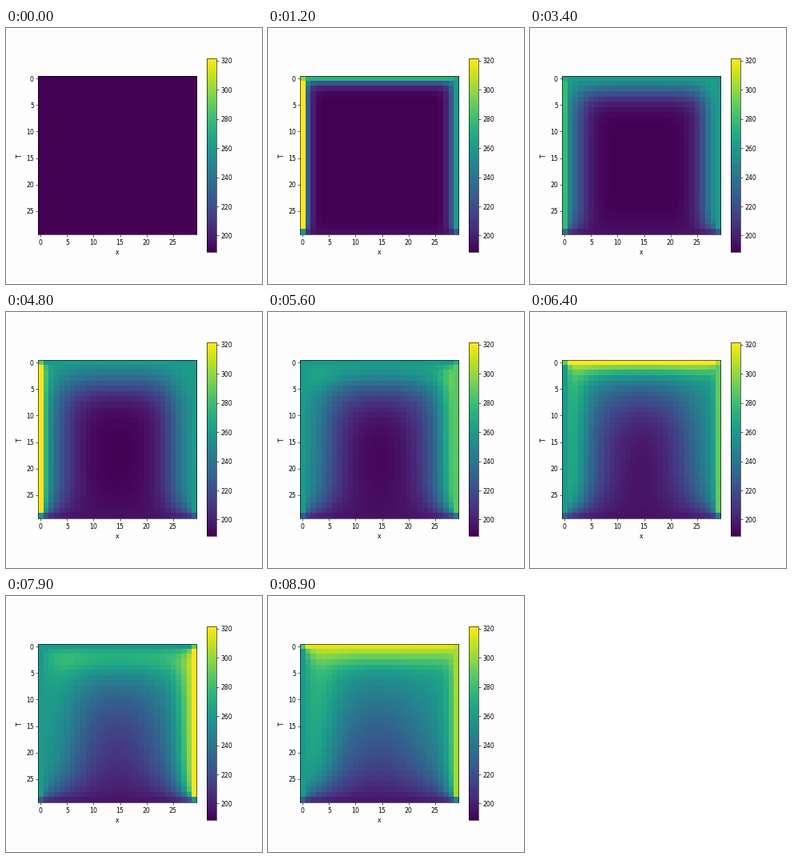
Write a matplotlib script that moves like this. It is 320x320 px and loops after 9 s.

```python
import numpy as np
import matplotlib.pyplot as plt
from matplotlib.animation import FuncAnimation

N = 30                  # cells per side
FRAMES = 90
SUBSTEPS = 12
COLD, HOT = 188.7, 321.4
SHADE, LIT = 260, 323   # wall temperature without and with full sun
FLOOR = 195

# The sun circles the plate and heats left, top and right in turn
PERIOD = 12.25
START = 1.85
LEFT, TOP, RIGHT = 1.5, 4.1, 6.7
HALF_WIDTH = 2.8


def wall(peak, t):
    """Radiative balance of a wall facing the sun around its peak phase."""
    away = (t + START - peak + PERIOD / 2) % PERIOD - PERIOD / 2
    sun = np.cos(np.pi / 2 * min(1, abs(away) / HALF_WIDTH))
    return (SHADE**4 + sun * (LIT**4 - SHADE**4)) ** 0.25


def apply_walls(u, t):
    left, top, right = (wall(peak, t) for peak in (LEFT, TOP, RIGHT))
    u[0] = top
    u[-1] = 0.6 * FLOOR + 0.4 * u[-2]
    u[:, 0], u[:, -1] = left, right
    for col, side in ((0, left), (-1, right)):
        u[0, col] = (side + top) / 2
        u[-1, col] = (side + FLOOR) / 2


def diffuse(u, d):
    u[1:-1, 1:-1] += d * (u[:-2, 1:-1] + u[2:, 1:-1] + u[1:-1, :-2]
                          + u[1:-1, 2:] - 4 * u[1:-1, 1:-1])


def simulate():
    u = np.full((N, N), COLD)
    states = [u.copy()]
    for n in range(1, FRAMES):
        for t in n - 1 + np.arange(1, SUBSTEPS + 1) / SUBSTEPS:
            apply_walls(u, t)
            diffuse(u, (0.05 + 2.4e-4 * t * t) / SUBSTEPS)
        states.append(u.copy())
    return states


states = simulate()

plt.rcParams.update({"font.family": "DejaVu Sans", "font.size": 10.5})
fig, ax = plt.subplots(figsize=(6, 6), dpi=320 / 6, facecolor="#fdfdfd")
fig.subplots_adjust(left=0.125, right=0.9, bottom=0.125, top=0.88)
image = ax.imshow(states[0], cmap="viridis", vmin=COLD, vmax=HOT,
                  interpolation="nearest")
ax.set(xlabel="x", ylabel="T", xticks=range(0, N, 5), yticks=range(0, N, 5))
fig.colorbar(image, ax=ax)


def update(n):
    image.set_data(states[n])
    return [image]


anim = FuncAnimation(fig, update, frames=FRAMES, interval=100,
                     repeat=True, repeat_delay=0)
plt.show()
```
